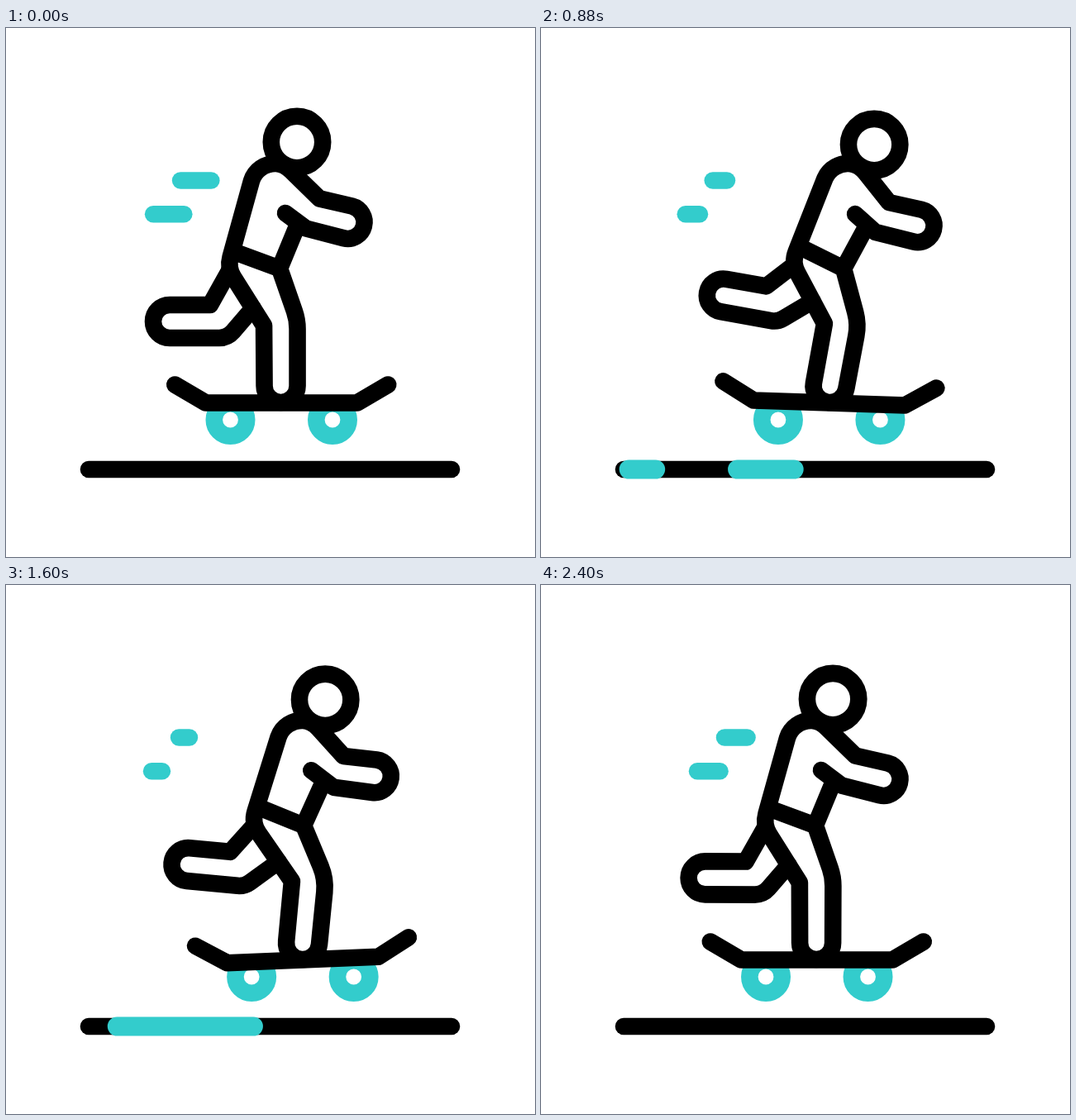
These frames come from a looping animation (640x640 px, 2440 ms). An HTML page with a canvas:

```html
<!DOCTYPE html>
<html lang="en">
<head>
<meta charset="utf-8">
<title>Skateboarder</title>
<style>
  html, body { margin: 0; width: 100%; height: 100%; overflow: hidden; background: #fff; }
  canvas { display: block; width: 640px; height: 640px; }
</style>
</head>
<body>
<canvas id="stage"></canvas>
<script>
const LOOP = 2440, INK = '#000', TEAL = '#33cccc', LINE = 20.6;
const canvas = document.getElementById('stage');
const ctx = canvas.getContext('2d');
const dpr = window.devicePixelRatio || 1;
canvas.width = canvas.height = 640 * dpr;
ctx.scale(dpr, dpr);
ctx.lineCap = ctx.lineJoin = 'round';

const rad = d => d * Math.PI / 180;
const lerp = (a, b, u) => a + (b - a) * u;
const mix = (p, q, u) => [lerp(p[0], q[0], u), lerp(p[1], q[1], u)];
const ease = x => {
  const u = Math.min(1, Math.max(0, x));
  return u * u * (3 - 2 * u);
};
const span = (t, from, to) => ease((t - from) / (to - from));

// Eased motion through [time, value] keys
function track(keys, t) {
  let i = 0;
  while (i < keys.length - 2 && t >= keys[i + 1][0]) i++;
  const [t0, a] = keys[i], [t1, b] = keys[i + 1];
  return lerp(a, b, span(t, t0, t1));
}

const MOVES = {
  ride:  [[0, 333.25], [520, 371.2], [1160, 333.25], [1870, 371.2], [LOOP, 333.25]],
  tilt:  [[0, 0], [690, 3.3], [1390, -4.8], [1800, 0], [LOOP, 0]],
  torso: [[0, 0], [640, 10.2], [1300, -3.5], [1880, 6.8], [LOOP, 0]],
  hip:   [[0, 0], [665, 30.6], [1330, -14], [1880, 21.8], [LOOP, 0]],
  leg:   [[0, 0], [620, 17.8], [1300, -4], [1880, 14.5], [LOOP, 0]],
  arm:   [[0, 0], [560, -12.8], [1200, -0.5], [1880, -13.6], [LOOP, 0]]
};

// Local coordinates, rotated and placed on the stage
function joint([x0, y0], deg) {
  const c = Math.cos(rad(deg)), s = Math.sin(rad(deg));
  return (x, y) => [x0 + x * c - y * s, y0 + x * s + y * c];
}

function stroke(color, width, build) {
  ctx.strokeStyle = color;
  ctx.lineWidth = width;
  ctx.beginPath();
  build();
  ctx.stroke();
}
const move = p => ctx.moveTo(...p);
const line = (...pts) => pts.forEach(p => ctx.lineTo(...p));
const curve = (a, b, c) => ctx.bezierCurveTo(...a, ...b, ...c);
const corner = (p, next, r) => ctx.arcTo(...p, ...next, r);
const cap = (c, from, to) => ctx.arc(...c, 20, rad(from), rad(to), true);
const bar = (color, width, x0, x1, y) =>
  stroke(color, width, () => { move([x0, y]); line([x1, y]); });

function drawGround(t) {
  const left = 100, len = 439, y = 534;
  bar(INK, LINE, left, left + len, y);
  for (const start of [200, 800, 1400]) {
    const u = t - start;
    if (u <= 0 || u >= 800) continue;
    const shift = ease(u / 800) / 2;
    const a = ease((u - 320) / 480) + shift, b = ease(u / 480) + shift;
    // The stroke wraps from the right end to the left end
    for (const k of [0, 1]) {
      const from = Math.max(0, a - k), to = Math.min(1, b - k);
      if (to - from > 0.0005) bar(TEAL, 23, left + from * len, left + to * len, y);
    }
  }
}

// Head start, head end, tail start, tail end, tail from, tail to
const REACH = 95;
const GUSTS = [
  [-265, 255, 0, 320, 11.7, REACH],
  [600, 1125, 635, 1230, 0, REACH],
  [1325, 1850, 1355, 1920, 0, REACH],
  [2175, 2695, 2240, 2440, 0, 11.7]
];

function drawWind(t) {
  for (const [h0, h1, t0, t1, from, to] of GUSTS) {
    const head = REACH * span(t, h0, h1);
    const tail = lerp(from, to, span(t, t0, t1));
    if (t < h0 || head - tail < 0.05) continue;
    bar(TEAL, LINE, 260 - head, 260 - tail, 184.5);
    bar(TEAL, LINE, 227 - head, 227 - tail, 225.3);
  }
}

function drawWheels(x) {
  ctx.save();
  ctx.beginPath();
  ctx.rect(0, 454, 640, 80);
  ctx.clip();
  for (const dx of [-61.75, 61.75])
    stroke(TEAL, LINE, () => ctx.arc(x + dx, 474, 19.7, 0, 7));
  ctx.restore();
}

function drawRider(t) {
  const { ride, tilt, torso, hip, leg, arm } = Object.fromEntries(
    Object.entries(MOVES).map(([name, keys]) => [name, track(keys, t)]));
  const hipX = ride - 2.25 + hip;
  const foreDeg = 14.6 + torso + arm, backDeg = leg * 0.95;

  const B = joint([ride, 453.5], tilt);
  const T = joint([hipX, 291], torso);
  const A = joint(T(40.5, -67), foreDeg);
  const S = joint([ride - 0.7 + 0.15 * leg, 433], leg);
  const F = joint([hipX - 133 - 1.15 * leg, 355 - 2.95 * leg], backDeg);
  const seat = T(-63, -1), knee = S(-20.5, -73);

  drawWheels(ride);

  // Trailing leg
  stroke(INK, LINE, () => {
    const end = mix(seat, knee, 0.7 - 0.006 * leg);
    move(mix(seat, knee, 0.05));
    line(F(49, -20), F(0, -20));
    cap(F(0, 0), backDeg - 90, backDeg - 270);
    corner(F(70, 20), end, 22);
    line(end);
  });

  // Arm, back, standing leg and chest in one line, then the waist
  stroke(INK, LINE, () => {
    move(T(7, -67));
    line(A(-4, 20), A(43.4, 20));
    cap(A(43.4, 0), foreDeg + 90, foreDeg - 90);
    line(A(3, -19), T(14, -118));
    curve(T(9, -123), T(3, -127), T(-5, -127));
    curve(T(-18, -127), T(-30, -119), T(-34, -106));
    corner(seat, knee, 30);
    line(knee, S(-20, 0));
    cap(S(0, 0), leg + 180, leg);
    corner(S(20, -80), T(0, 0), 65);
    line(T(0, 0), T(21, -51));
    move(T(0, 0));
    line(T(-57, -21));
  });

  stroke(INK, LINE, () => ctx.arc(...T(21, -153), 31.2, 0, 7));

  stroke(INK, LINE, () => {
    move(B(-129, -22));
    line(B(-91.5, 0), B(91.5, 0), B(129, -22));
  });
}

let begin;
function frame(now) {
  begin ??= now;
  const t = (now - begin) % LOOP;
  ctx.fillStyle = '#fff';
  ctx.fillRect(0, 0, 640, 640);
  drawWind(t);
  drawRider(t);
  drawGround(t);
  requestAnimationFrame(frame);
}
requestAnimationFrame(frame);
</script>
</body>
</html>
```
